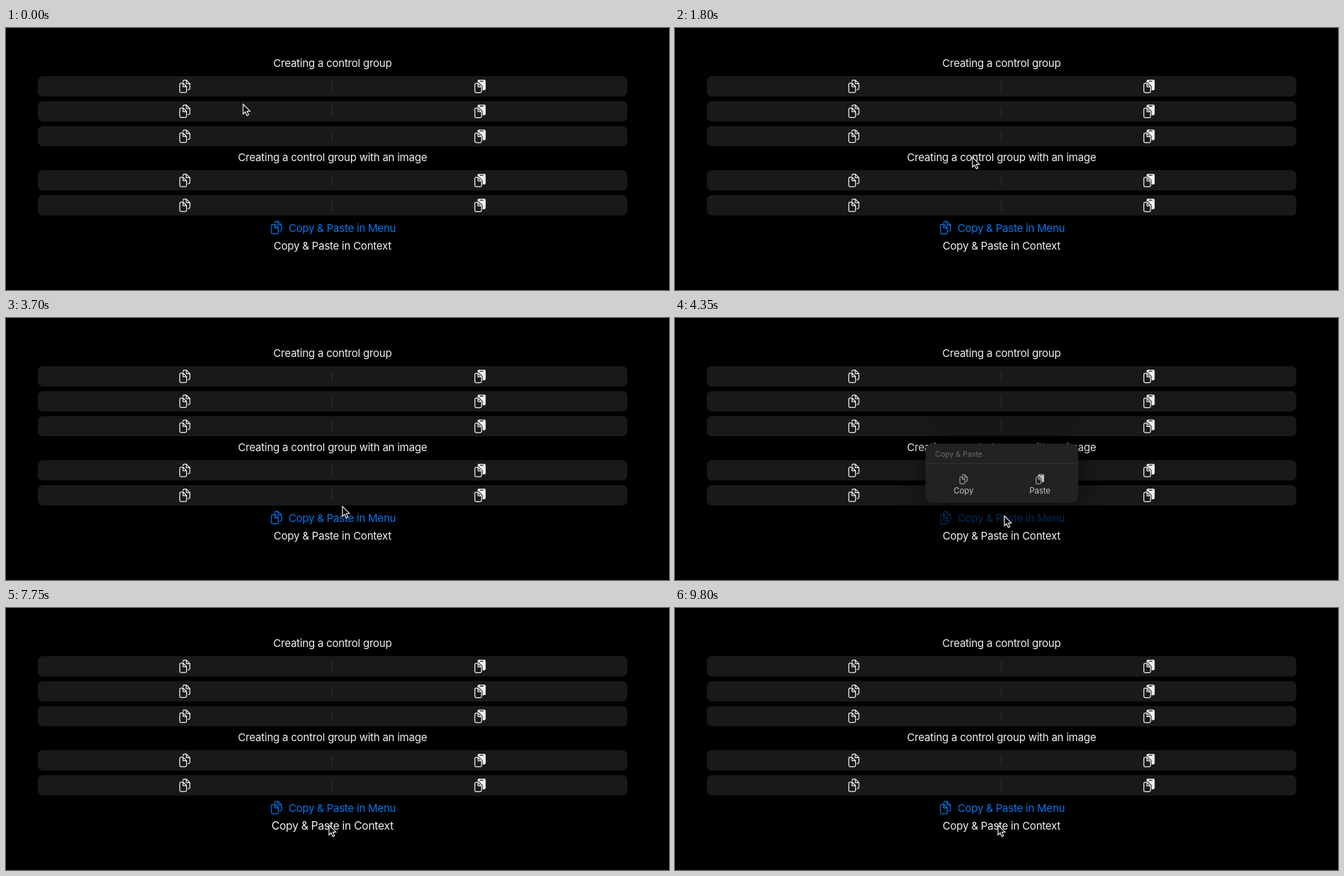
These frames come from a looping animation (934 by 370 pixels, 9.85 s). An HTML page with a canvas:

```html
<!DOCTYPE html>
<html lang="en">
<head>
<meta charset="utf-8">
<title>Control groups</title>
<style>
html, body { margin: 0; width: 100%; height: 100%; overflow: hidden; background: #000; }
canvas { display: block; width: 934px; height: 370px; }
</style>
</head>
<body>
<canvas id="stage"></canvas>
<script>
const W = 934, H = 370, LOOP = 9850;
const canvas = document.getElementById('stage');
const ctx = canvas.getContext('2d');
const ratio = window.devicePixelRatio || 1;
canvas.width = W * ratio;
canvas.height = H * ratio;

const ROWS = [68, 103.2, 138.4, 200.8, 236];
const ROW_FILL = '#19191b', MENU_FILL = '#222223', WHITE = '#f2f2f2', BLUE = '#0875ea';

// Pointer tip: time, x, y
const POINTER = [
  [0, 334, 107], [1800, 419, 182], [2050, 419, 182], [3080, 504, 231],
  [4000, 464, 277], [4150, 464, 279], [5050, 464, 279], [5450, 456, 300],
  [6050, 456, 300], [6650, 455, 306], [LOOP, 455, 306]
];

const clamp = v => Math.max(0, Math.min(1, v));
const ease = v => v * v * (3 - 2 * v);
const ramp = (t, a, b) => ease(clamp((t - a) / (b - a)));
const pulse = (t, a, b, c, d) => ramp(t, a, b) * (1 - ramp(t, c, d));

function pointerAt(t) {
  let i = 1;
  while (i < POINTER.length - 1 && t > POINTER[i][0]) i++;
  const [t0, x0, y0] = POINTER[i - 1], [t1, x1, y1] = POINTER[i];
  const k = ramp(t, t0, t1);
  return [x0 + (x1 - x0) * k, y0 + (y1 - y0) * k];
}

function box(x, y, w, h, r, fill) {
  ctx.beginPath();
  ctx.roundRect(x, y, w, h, r);
  ctx.fillStyle = fill;
  ctx.fill();
}

function text(str, x, y, size, color, align = 'center', spacing = -0.23) {
  ctx.font = `${size}px Inter, "Liberation Sans", sans-serif`;
  ctx.letterSpacing = spacing + 'px';
  ctx.textAlign = align;
  ctx.fillStyle = color;
  ctx.fillText(str, x, y);
}

// Page outline with a folded top right corner; back adds a gap around it
function page(x, y, w, h, color, back) {
  const cut = 5, r = 1.8;
  ctx.lineJoin = 'round';
  ctx.beginPath();
  ctx.moveTo(x + r, y);
  ctx.lineTo(x + w - cut, y);
  ctx.lineTo(x + w, y + cut);
  ctx.arcTo(x + w, y + h, x, y + h, r);
  ctx.arcTo(x, y + h, x, y, r);
  ctx.arcTo(x, y, x + w, y, r);
  ctx.closePath();
  if (back) {
    ctx.fillStyle = ctx.strokeStyle = back;
    ctx.lineWidth = 3.2;
    ctx.fill();
    ctx.stroke();
  }
  ctx.strokeStyle = color;
  ctx.lineWidth = 1.25;
  ctx.stroke();
  ctx.beginPath();
  ctx.moveTo(x + w - cut, y);
  ctx.lineTo(x + w - cut, y + cut);
  ctx.lineTo(x + w, y + cut);
  ctx.stroke();
}

function at(x, y, scale, draw) {
  ctx.save();
  ctx.translate(x, y);
  ctx.scale(scale, scale);
  draw();
  ctx.restore();
}

function copyIcon(x, y, color, back, scale = 1) {
  at(x, y, scale, () => {
    page(-2.4, -8.7, 9.6, 13.4, color);
    page(-7, -4.5, 9.6, 13.4, color, back);
  });
}

function pasteIcon(x, y, color, back, scale = 1) {
  at(x, y, scale, () => {
    box(-3.4, -9.2, 11.4, 15, 2, color);
    box(-0.4, -7.9, 5.4, 1.3, 0.6, back);
    page(-7.2, -4.3, 9.4, 13.4, color, back);
  });
}

// Panel above a label, growing out of it
function menu(open, dy) {
  if (open <= 0) return;
  ctx.save();
  ctx.globalAlpha = open;
  const s = 0.3 + 0.7 * open;
  ctx.translate(460.5, 262 + dy);
  ctx.scale(s, s);
  ctx.translate(-460.5, -262);
  ctx.save();
  ctx.shadowColor = 'rgba(0,0,0,.55)';
  ctx.shadowBlur = 34 * ratio;
  box(353, 177.5, 215, 83.5, 9, MENU_FILL);
  ctx.restore();
  ctx.fillStyle = '#323233';
  ctx.fillRect(353, 205, 215, 1.2);
  text('Copy & Paste', 366.5, 196.4, 10.5, '#6d6d6e', 'left', 0);
  copyIcon(406.5, 227.5, '#bdbdbd', MENU_FILL, 0.74);
  pasteIcon(514, 227.5, '#c6c6c6', MENU_FILL, 0.74);
  text('Copy', 406.5, 247.8, 11.4, '#c2c2c2', 'center', -0.1);
  text('Paste', 514, 247.8, 11.4, '#c2c2c2', 'center', -0.1);
  ctx.restore();
}

function pointer(x, y) {
  ctx.beginPath();
  [[0, 0.5], [0, 14.4], [3.1, 11.5], [5.4, 16.8], [7.8, 15.8], [5.5, 10.6], [9.9, 10.4]]
    .forEach(([dx, dy]) => ctx.lineTo(x + dx, y + dy));
  ctx.closePath();
  ctx.fillStyle = '#000';
  ctx.fill();
  ctx.strokeStyle = '#fff';
  ctx.lineWidth = 1.1;
  ctx.lineJoin = 'miter';
  ctx.stroke();
}

function draw(t) {
  ctx.setTransform(ratio, 0, 0, ratio, 0, 0);
  ctx.fillStyle = '#000';
  ctx.fillRect(0, 0, W, H);

  for (const y of ROWS) {
    box(44.7, y, 830.6, 28.7, 7, ROW_FILL);
    ctx.fillStyle = '#303032';
    ctx.fillRect(459, y + 7, 1, 15);
    copyIcon(251.8, y + 14.3, WHITE, ROW_FILL);
    pasteIcon(667.7, y + 14.3, WHITE, ROW_FILL);
  }
  text('Creating a control group', 460, 54.9, 15, WHITE);
  text('Creating a control group with an image', 460, 187.7, 15, WHITE);

  const open = pulse(t, 4080, 4340, 5300, 5600);
  ctx.globalAlpha = 1 - 0.62 * open;
  copyIcon(381, 281.8, BLUE, '#000');
  text('Copy & Paste in Menu', 398, 287.6, 15, BLUE, 'left');
  ctx.globalAlpha = 1;
  menu(open, 0);

  // long press: the label lifts, the rest dims
  const lift = pulse(t, 7420, 7750, 8900, 9250);
  const context = pulse(t, 7780, 8120, 8850, 9200);
  ctx.fillStyle = `rgba(0,0,0,${0.4 * context})`;
  ctx.fillRect(0, 0, W, H);
  at(460, 307, 1 + 0.036 * lift, () => text('Copy & Paste in Context', 0, 5.6, 15, WHITE));
  menu(context, 26);

  pointer(...pointerAt(t));
}

const start = performance.now();
function tick() {
  draw((performance.now() - start) % LOOP);
  requestAnimationFrame(tick);
}
tick();
</script>
</body>
</html>
```
